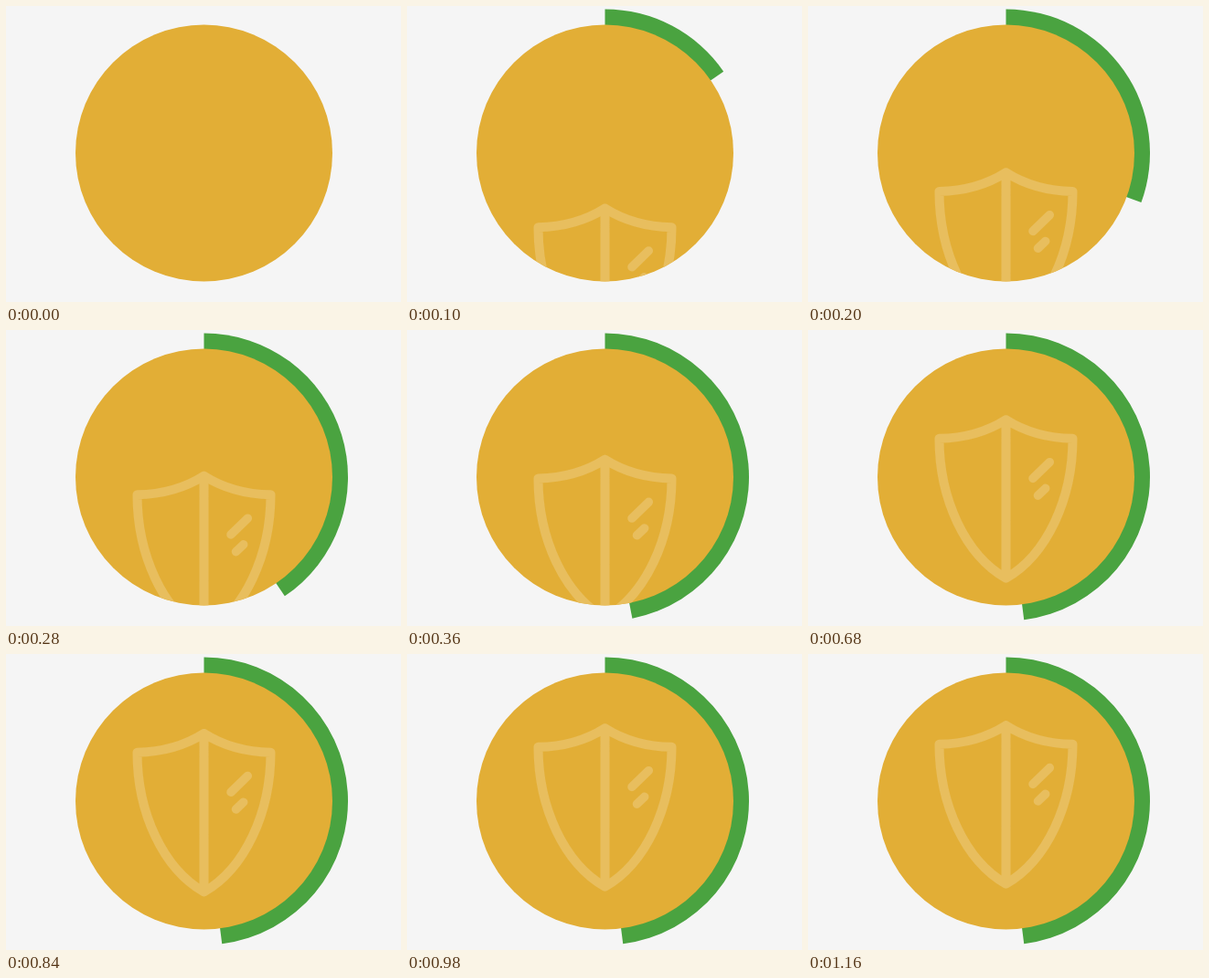
These frames come from a looping animation (432 px wide and 324 px high, 1.24 s). An HTML page:

```html
<!DOCTYPE html>
<html lang="en">
<head>
<meta charset="utf-8">
<title>Shield gauge</title>
<style>
  html, body { margin: 0; height: 100%; overflow: hidden; background: #f5f5f5; }
  svg { display: block; width: 100vw; height: 100vh; }
</style>
</head>
<body>
<svg viewBox="0 0 432 324">
  <clipPath id="disc"><circle cx="216.5" cy="161" r="140.5"/></clipPath>
  <path id="gauge" fill="#4aa340"/>
  <circle cx="216.5" cy="161" r="140.5" fill="#e2ae36"/>
  <g clip-path="url(#disc)">
    <g id="shield" fill="none" stroke="#e8be5e" stroke-width="10" stroke-linecap="round" stroke-linejoin="round">
      <path d="M216.5 78Q248 98 289.5 98.7C289.5 165 261 226 216.5 251.5C172 226 143.5 165 143.5 98.7Q185 98 216.5 78V251.5"/>
      <path stroke-width="9.5" d="M246 142.3L264.3 124.5M251.5 161L259.7 153.2"/>
    </g>
  </g>
</svg>
<script>
const LOOP = 1240, STEP = 20, LAST = 1160;
const CX = 216.5, CY = 161, OUTER = 157.5;
const gauge = document.getElementById('gauge');
const shield = document.getElementById('shield');

// Cubic Bézier easing whose second handle ends at y = 1
function bezier(x1, y1, x2) {
  const at = (s, a, b) => 3 * (1 - s) ** 2 * s * a + 3 * (1 - s) * s * s * b + s ** 3;
  return t => {
    if (t <= 0) return 0;
    if (t >= 1) return 1;
    let lo = 0, hi = 1;
    for (let i = 0; i < 30; i++) {
      const mid = (lo + hi) / 2;
      if (at(mid, x1, x2) < t) lo = mid; else hi = mid;
    }
    return at(lo, y1, 1);
  };
}

const sweep = bezier(0.167, 0.167, 0.667);
const rise = bezier(0, 0.3, 0.2);

function draw(now) {
  const t = Math.min(Math.floor(now % LOOP / STEP) * STEP, LAST);
  const angle = 0.48 * 2 * Math.PI * sweep(t / 400);
  const x = CX + OUTER * Math.sin(angle), y = CY - OUTER * Math.cos(angle);
  gauge.setAttribute('d', angle
    ? `M${CX} ${CY}V${CY - OUTER}A${OUTER} ${OUTER} 0 0 1 ${x} ${y}Z` : '');
  shield.setAttribute('transform', `translate(0 ${238 * (1 - rise(t / 1200))})`);
}

const start = performance.now();
function tick() {
  draw(performance.now() - start);
  requestAnimationFrame(tick);
}
tick();
</script>
</body>
</html>
```
